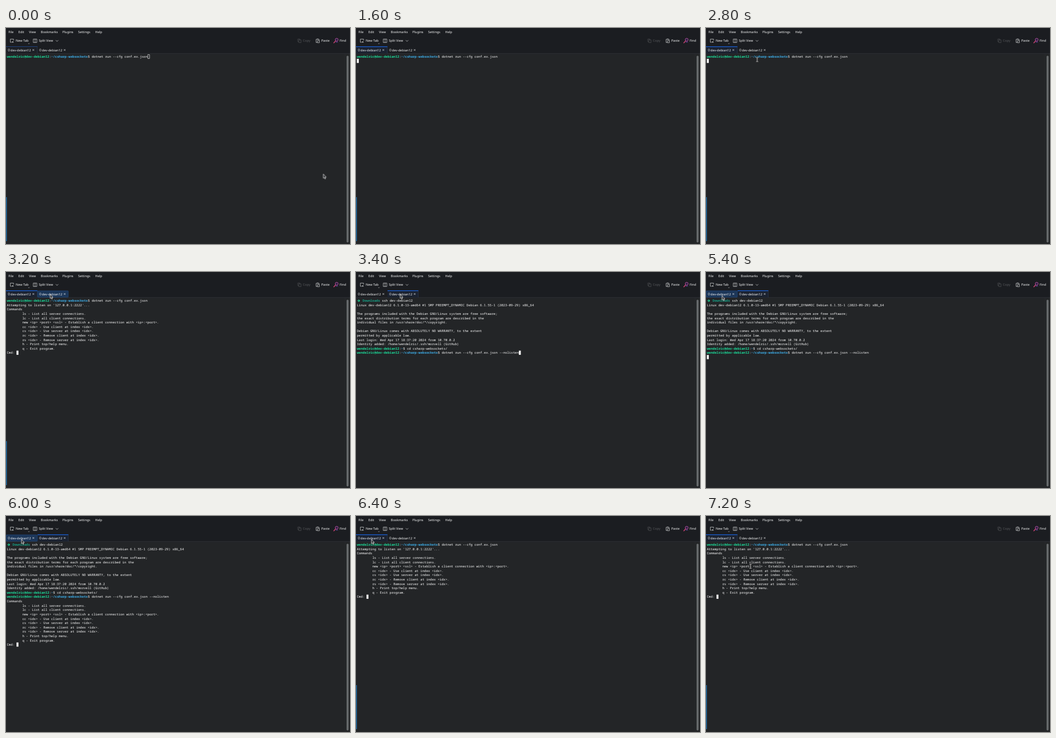
Write an HTML page that moves like this. It is 600 px wide and 378 px high and loops after 8 s.

```html
<!DOCTYPE html>
<html lang="en">
<head>
<meta charset="utf-8">
<title>Terminal</title>
<style>
html, body { margin: 0; width: 100%; height: 100%; overflow: hidden; background: #232527; }
svg { display: block; width: 600px; height: 378px; }
text { font: 5.58px "Noto Sans", sans-serif; fill: #f4f5f5; white-space: pre; text-rendering: geometricPrecision; }
.term text { font: 5.607px "Noto Sans Mono", "DejaVu Sans Mono", monospace; fill: #fcfcfc; }
.term .user { fill: #1cdc9a; font-weight: 700; }
.term .path { fill: #3daee9; font-weight: 700; }
.term .dir { fill: #16a085; font-weight: 700; }
.line { fill: none; stroke: #e8e9ea; stroke-width: .65; }
.off { opacity: .27; }
.block { fill: #fcfcfc; }
#mouse { animation: move 8s step-end infinite; }
@keyframes move {
  0% { transform: translate(553.5px, 255.5px); }
  2.5% { transform: translate(528px, 246px); }
  5% { transform: translate(468px, 228px); }
  7.5% { transform: translate(385px, 206px); }
  10% { transform: translate(306px, 188px); }
  12.5% { transform: translate(258px, 178px); }
  15% { transform: translate(240px, 175px); }
  27.5% { transform: translate(236px, 168px); }
  30% { transform: translate(200px, 140px); }
  32.5% { transform: translate(138px, 92px); }
  35% { transform: translate(89.3px, 55.3px); }
  37.5% { transform: translate(79px, 42px); }
  40% { transform: translate(77px, 38.7px); }
  45% { transform: translate(78px, 49px); }
  47.5% { transform: translate(90px, 90px); }
  50% { transform: translate(105px, 132px); }
  52.5% { transform: translate(109px, 140px); }
  60% { transform: translate(57.3px, 52.5px); }
  62.5% { transform: translate(36px, 43px); }
  65% { transform: translate(30px, 42px); }
  67.5% { transform: translate(28px, 41.5px); }
  70% { transform: translate(27px, 40px); }
  72.5% { transform: translate(27px, 40.8px); }
  82.5% { transform: translate(32px, 50px); }
  85% { transform: translate(52px, 70px); }
  87.5% { transform: translate(70px, 84px); }
  90%, 100% { transform: translate(77.6px, 88px); }
}
</style>
</head>
<body>
<svg id="stage" viewBox="0 0 600 378"></svg>
<script>
const LOOP = 8000, CELL = 3.364, PITCH = 7.61, LEFT = 1.5, TOP = 46.3;
const HOST = "wendelric@dev-debian12";
const sheet = document.createElement("style");
let count = 0;

// Shows markup only in the given [start, end) spans of the loop.
function during(spans, markup) {
  const name = "on" + count++;
  const pct = ms => ms / LOOP * 100 + "%";
  const keys = spans[0][0] ? ["0% { visibility: hidden }"] : [];
  for (const [from, to] of spans) {
    keys.push(`${pct(from)} { visibility: visible }`);
    keys.push(`${pct(to)} { visibility: ${to < LOOP ? "hidden" : "visible"} }`);
  }
  if (spans.at(-1)[1] < LOOP) keys.push("100% { visibility: hidden }");
  sheet.textContent += `@keyframes ${name} { ${keys.join(" ")} }
    .${name} { animation: ${name} ${LOOP}ms step-end infinite }`;
  return `<g class="${name}">${markup}</g>`;
}

const esc = s => s.replace(/</g, "&lt;").replace(/>/g, "&gt;");
const label = (x, y, s, cls = "") => `<text x="${x}" y="${y}" class="${cls}">${esc(s)}</text>`;
const rect = (x, y, w, h, fill) => `<rect x="${x}" y="${y}" width="${w}" height="${h}" fill="${fill}"/>`;
const path = (d, cls = "line") => `<path class="${cls}" d="${d}"/>`;
const colX = col => LEFT + col * CELL;
const put = (row, col, s, cls) => label(colX(col), TOP + row * PITCH + 5.85, s, cls);
const block = (row, col) =>
  `<rect class="block" x="${colX(col)}" y="${TOP + row * PITCH}" width="${CELL}" height="7.3"/>`;
const lines = (row, list) => list.map((s, i) => put(row + i, 0, s)).join("");

function prompt(row, dir, cmd) {
  const at = HOST.length + 1, end = at + dir.length;
  return put(row, 0, HOST, "user") + put(row, at - 1, ":") +
    put(row, at, dir, "path") + put(row, end, "$ " + cmd);
}

function help(row) {
  const items = ["ls - List all server connections.", "lc - List all client connections.",
    "new <ip> <port> <ssl> - Establish a client connection with <ip>:<port>.",
    "cc <idx> - Use client at index <idx>.", "cs <idx> - Use server at index <idx>.",
    "rc <idx> - Remove client at index <idx>.", "rs <idx> - Remove server at index <idx>.",
    "h - Print top/help menu.", "q - Exit program."];
  return put(row, 0, "Commands") + items.map((s, i) => put(row + 1 + i, 8, s)).join("") +
    put(row + 10, 0, "Cmd:") + block(row + 10, 5);
}

const menu = [[4.2, "File"], [21.6, "Edit"], [40, "View"], [60.8, "Bookmarks"],
  [98.3, "Plugins"], [125.8, "Settings"], [155.6, "Help"]].map(([x, s]) => label(x, 8.5, s)).join("");

const toolbar =
  path("M10 25H7.6V19.4H13.2V22M11.8 23V26M10.3 24.5H13.3") + label(17, 24.4, "New Tab") +
  path("M38.9 26.8l1 1l1-1") +
  path("M47.6 19.4H53.8V25.4H47.6ZM50.7 19.4V25.4") + label(57.2, 24.4, "Split View") +
  path("M86.8 21.3l2.2 2.2l2.2-2.2") +
  `<g class="off">${path("M510.6 24H509V19.3H512.6V20.8M510.8 20.8H514.6V25.6H510.8Z")}${label(517.8, 24.4, "Copy")}</g>` +
  path("M543 25.4H540.9V19.8H546.1V21.8M542.3 19.2H544.8M543.2 22H546.6V25.8H543.2Z") + label(550, 24.4, "Paste") +
  `<circle cx="576.8" cy="20.6" r="2.6" fill="#2b2440" stroke="#b04a9c" stroke-width="1"/>
   <path d="M574.8 22.6L571.8 26" stroke="#e0487c" stroke-width="1.2" stroke-linecap="round"/>
   <path d="M575 24.6H579" stroke="#6c4ec0" stroke-width=".8"/>` +
  label(582, 24.4, "Find");

function tabFace(x, w, lit) {
  return rect(x, 32.4, w, 12.1, lit ? "#1b2230" : "#1d2026") +
    rect(x, 32.2, w, lit ? 1.1 : .7, lit ? "#1a66e8" : "#21509c") +
    rect(x + w - .5, 32.4, .5, 12, "#30405c");
}
const hover = (x, w) =>
  `<rect x="${x + .3}" y="32.9" width="${w - .7}" height="11.2" rx="1" fill="#1c3658" stroke="#205598" stroke-width=".5"/>`;
const tabText = x => path(`M${x + 1.3} 36.4q-1.6 2.2 0 4.4M${x + 2.5} 36.4q1.6 2.2 0 4.4`) +
  label(x + 4.7, 40.6, "dev-debian12") + path(`M${x + 42.9} 37l3 3m0-3l-3 3`);

const FIRST = [[0, 3400], [6400, LOOP]], SECOND = [[3400, 6400]];
const tabs =
  during([[0, 1200]], tabFace(0, 55, false)) +
  during([[1200, 3400], [6400, LOOP]], tabFace(0, 55, true)) +
  during(SECOND, tabFace(55, 54, true)) +
  during([[3000, 3400]], hover(55, 54)) +
  during([[5000, 6400]], hover(0, 55)) +
  tabText(3.3) + tabText(57.9);

const runCmd = "dotnet run --cfg conf.ex.json", repo = "~/csharp-websockets";
const hollow = `<rect x="${colX(73) + .3}" y="${TOP + .4}" width="3" height="6.9" class="line"/>`;

const first =
  during(FIRST, prompt(0, repo, runCmd) + rect(0, 296, 1.5, 77, "#1f6ca6")) +
  during([[0, 1200]], hollow) +
  during([[1200, 1600]], block(0, 73)) +
  during([[1600, 3000]], block(1, 0)) +
  during([[3000, 3400], [6400, LOOP]],
    put(1, 0, "Attempting to listen on '127.0.0.1:2222'...") + help(2));

const second =
  during(SECOND,
    path("M2.2 50.2H6M4.3 48.3L6.4 50.2L4.3 52.1", "line arrow") +
    put(0, 3, "Downloads", "dir") + put(0, 13, "ssh dev-debian12") +
    lines(1, ["Linux dev-debian12 6.1.0-13-amd64 #1 SMP PREEMPT_DYNAMIC Debian 6.1.55-1 (2023-09-29) x86_64", "",
      "The programs included with the Debian GNU/Linux system are free software;",
      "the exact distribution terms for each program are described in the",
      "individual files in /usr/share/doc/*/copyright.", "",
      "Debian GNU/Linux comes with ABSOLUTELY NO WARRANTY, to the extent",
      "permitted by applicable law.",
      "Last login: Wed Apr 17 18:37:20 2024 from 10.70.0.2",
      "Identity added: /home/wendelric/.ssh/morvell (GitHub)"]) +
    prompt(11, "~", "cd csharp-websockets/") + prompt(12, repo, runCmd + " --nolisten")) +
  during([[3400, 4400]], block(12, 84)) +
  during([[4400, 5800]], block(13, 0)) +
  during([[5800, 6400]], help(13));

const arrow = `<path d="M0 0V7.4L1.7 6L2.8 8.6L4 8.1L2.9 5.6H5Z" fill="#24262a" stroke="#f4f4f4" stroke-width=".75" stroke-linejoin="round"/>`;
const bar = "M-1.7-3.6H-.5L0-3.1L.5-3.6H1.7M0-3.1V3.1M-1.7 3.6H-.5L0 3.1L.5 3.6H1.7";
const beam = `<path d="${bar}" fill="none" stroke="#111" stroke-width="1.9"/>
  <path d="${bar}" fill="none" stroke="#fff" stroke-width=".85"/>`;
const mouse = `<g id="mouse">` +
  during([[0, 200], [3000, 3600], [5000, 6600]], arrow) +
  during([[200, 1600], [2200, 3000], [3600, 4400], [4600, 5000], [6600, LOOP]], beam) + `</g>`;

sheet.textContent += " .arrow { stroke: #1cdc9a; stroke-width: 1.1 }";
const markup = rect(0, 0, 600, 45, "#1b1d21") + rect(0, 44.4, 600, .7, "#33373d") +
  menu + toolbar + tabs +
  rect(591, 45.1, .5, 332.9, "#2d3033") +
  `<rect x="594" y="48.4" width="3.6" height="327" rx="1.8" fill="#66696b"/>` +
  `<g class="term">${first}${second}</g>` + mouse;
document.head.append(sheet);
document.getElementById("stage").innerHTML = markup;
</script>
</body>
</html>
```
